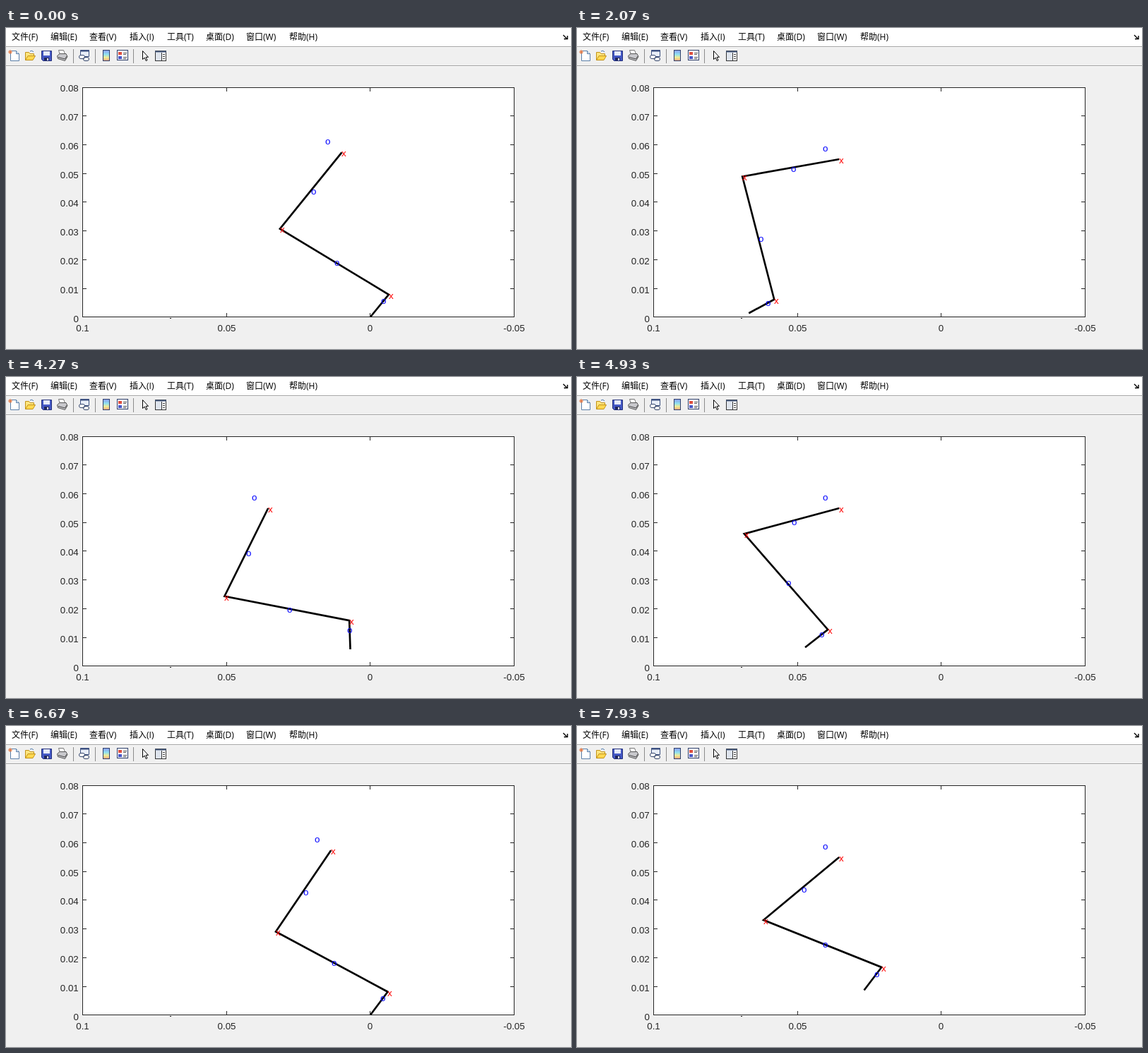
Write an HTML page that moves like this. It is 800x455 px and loops after 8 s.

```html
<!DOCTYPE html>
<html lang="zh">
<head>
<meta charset="utf-8">
<style>
  html, body { margin: 0; width: 100%; height: 100%; overflow: hidden; background: #f0f0f0; }
  svg { display: block; width: 800px; height: 455px; }
  .menu { font: 12px "Open Sans", "Noto Sans CJK SC", "Noto Sans CJK", sans-serif; }
  .label, .mark { font: 13.33px "Liberation Sans", Arial, sans-serif; }
  .label { fill: #262626; }
</style>
</head>
<body>
<svg viewBox="0 0 800 455">
  <defs>
    <linearGradient id="bar" x1="0" y1="0" x2="0" y2="1">
      <stop offset="0" stop-color="#8c9cf0"/><stop offset=".4" stop-color="#8fe0f0"/>
      <stop offset=".7" stop-color="#f5ee90"/><stop offset="1" stop-color="#f0a080"/>
    </linearGradient>
  </defs>
  <rect width="800" height="455" fill="#f0f0f0"/>
  <rect width="800" height="26" fill="#fff"/>
  <path d="M0 26.5H800M0 53.5H800" stroke="#a0a0a0"/>
  <path d="M0 27.5H800M0 54.5H800" stroke="#fff"/>
  <path d="M95.5 30V50M126.5 30V50M180.5 30V50" stroke="#8c8c8c"/>
  <path d="M789 10L794 15M795 11V15.5H790" fill="none" stroke="#000" stroke-width="1.4"/>

  <g id="icons">
    <path d="M6.5 32.5H14.5L18.5 36.5V46.5H6.5Z" fill="#fff" stroke="#5b7fa8"/>
    <path d="M14.5 32.5V36.5H18.5" fill="#d4e4f4" stroke="#5b7fa8"/>
    <path d="M3 34H9M6 31V37M4 32L8 36M8 32L4 36" stroke="#e8743a"/>
    <path d="M27.5 45.5V34.5H32.5L34 36.5H39.5V39" fill="#ffe680" stroke="#c29118"/>
    <path d="M27.5 45.5L31 39.5H41.5L38 45.5Z" fill="#ffd850" stroke="#c29118"/>
    <path d="M34 33Q37 31 39 34" fill="none" stroke="#4a78b0"/>
    <path d="M50.5 32.5H64.5V46.5H52.5L50.5 44.5Z" fill="#4458c4" stroke="#24307c"/>
    <path d="M53 33H62V39H53Z" fill="#e6ecfa"/>
    <path d="M54 42H61V46H54Z" fill="#20285c"/><path d="M58 43H60V46H58Z" fill="#fff"/>
    <path d="M76.5 38L74.5 31.5H81.5L84 38" fill="#fff" stroke="#777"/>
    <path d="M72.5 39.5L76 36.5H85L87 40.5L83.5 46.5L73.5 43.5Z" fill="#c8c8cc" stroke="#555"/>
    <path d="M74 41.5L83.5 44L86 40" fill="none" stroke="#444"/>
    <path d="M105.5 31.5H117.5V40.5H105.5Z" fill="#e8eef8" stroke="#3c5080"/>
    <path d="M105 32.5H118" stroke="#3c5080" stroke-width="2"/>
    <rect x="103.5" y="38.5" width="8" height="5" rx="2.5" fill="#fff" stroke="#34466c"/>
    <rect x="109.5" y="41.5" width="8" height="5" rx="2.5" fill="none" stroke="#34466c"/>
    <rect x="137.5" y="31.5" width="9" height="15" fill="url(#bar)" stroke="#30406c"/>
    <rect x="157.5" y="31.5" width="15" height="14" fill="#fff" stroke="#30406c"/>
    <path d="M159 34H164V38H159Z" fill="#e05040"/><path d="M159 40H164V44H159Z" fill="#4858c8"/>
    <path d="M166 35.5H171M166 37.5H170M166 41.5H171M166 43.5H170" stroke="#555"/>
    <path d="M193.5 32.5V44.5L196.2 42L198.2 46.5L200 45.7L198 41.3H201.5Z" fill="#fff" stroke="#000"/>
    <rect x="211.5" y="32.5" width="15" height="14" fill="#fff" stroke="#333"/>
    <path d="M211 33.5H227" stroke="#44587c" stroke-width="2"/>
    <path d="M220.5 35V46" stroke="#333"/><path d="M212 35H220V46H212Z" fill="#dfe5ee"/>
    <path d="M222 37.5H225M222 40.5H225M222 43.5H225" stroke="#444"/>
  </g>

  <rect x="108.5" y="84.5" width="611" height="325" fill="#fff" stroke="#262626"/>
  <path id="ticks" stroke="#262626"/>
  <g id="text"></g>
  <rect x="232" y="411" width="2" height="1" fill="#000"/>
  <polyline id="leg" fill="none" stroke="#000" stroke-width="2.67"/>
  <g id="marks"></g>
</svg>

<script>
const $ = id => document.getElementById(id);
const { sin, cos, PI } = Math;

function addText(parent, text, x, y, cls, attrs = {}) {
  const el = document.createElementNS('http://www.w3.org/2000/svg', 'text');
  el.textContent = text;
  for (const [k, v] of Object.entries({ x, y, class: cls, ...attrs })) el.setAttribute(k, v);
  return $(parent).appendChild(el);
}

// Menu
const menu = { '文件(F)': 8, '编辑(E)': 63, '查看(V)': 118, '插入(I)': 175,
               '工具(T)': 228, '桌面(D)': 283, '窗口(W)': 340, '帮助(H)': 401 };
for (const [name, x] of Object.entries(menu)) addText('text', name, x, 17, 'menu');

// Axes
let ticks = '';
for (let i = 0; i <= 8; i++) {
  const y = 410 - i * 40.78;
  if (i % 8) ticks += `M108 ${Math.floor(y) + .5}h6m600 0h6`;
  addText('text', i ? '0.0' + i : '0', 102.8, Math.round(y + 6.6), 'label', { 'text-anchor': 'end' });
}
['0.1', '0.05', '0', '-0.05'].forEach((name, i) => {
  const x = Math.round(108 + i * 203.67) + .5;
  ticks += `M${x} 84v6m0 314v6`;
  addText('text', name, x, 430, 'label', { 'text-anchor': 'middle' });
});
$('ticks').setAttribute('d', ticks);

// Gait: the foot swings forward over a resting hip, then the hip travels over a planted foot.
const PERIOD = 49.5, SWING = .6, STRIDE = 285.5;
const HIP = [371.2, 186], GROUND = 409.5;
const THIGH = 139.2, SHANK = 180, FOOT = 40.9;

const cycloid = t => t - sin(2 * PI * t) / (2 * PI);

function swing(t) {
  const reach = cycloid(.985 * t);
  const height = 35 * sin(PI * t ** .84) ** 2.5;
  const curl = t < .5 ? 27.5 * sin(2 * PI * t) ** 2 : 0;
  return { reach, curl, hip: HIP, toe: [516 - STRIDE * reach, GROUND - height] };
}

function stance(t) {
  const reach = 1 - t ** 1.1;
  const lift = 10 * (1 - (1 - t) ** 3) * (1 - t ** 20);
  return { reach, curl: 0, hip: [HIP[0] + STRIDE * reach, HIP[1] - lift], toe: [516, GROUND] };
}

function pose(phase) {
  const { reach, curl, hip, toe } =
    phase < SWING ? swing(phase / SWING) : stance((phase - SWING) / (1 - SWING));
  const tilt = (16 + 47 * reach ** .7 - curl) * PI / 180;
  const alongFoot = (length, side = 0) => [
    toe[0] + length * sin(tilt) - side * cos(tilt),
    toe[1] - length * cos(tilt) - side * sin(tilt)];
  const ankle = alongFoot(FOOT);

  // Two-link solution for the knee, bending to the left
  const dx = ankle[0] - hip[0], dy = ankle[1] - hip[1], dist = Math.hypot(dx, dy);
  const bend = Math.acos((THIGH ** 2 + dist ** 2 - SHANK ** 2) / (2 * THIGH * dist));
  const angle = Math.atan2(dx, dy) - bend;
  const knee = [hip[0] + THIGH * sin(angle), hip[1] + THIGH * cos(angle)];
  return { hip, knee, ankle, toe, footMass: alongFoot(28.5, 3.3) };
}

const middle = (a, b) => [(a[0] + b[0]) / 2, (a[1] + b[1]) / 2];
const marks = [...'xxxoooo'].map(c =>
  addText('marks', c, 0, 0, 'mark', { fill: c === 'x' ? '#f00' : '#00f' }));

function draw(now) {
  // 15 steps per second, held on a 10 ms clock
  const time = Math.floor(now % 8000 / 10) * 10;
  const step = Math.floor((time + 4) * .015);
  const { hip, knee, ankle, toe, footMass } = pose((step + 42.8) / PERIOD % 1);
  $('leg').setAttribute('points', [hip, knee, ankle, toe].join(' '));
  const spots = [hip, knee, ankle, [hip[0] - 23, hip[1] - 17],
    middle(hip, knee), middle(knee, ankle), footMass];
  spots.forEach(([x, y], i) => {
    marks[i].setAttribute('x', Math.round(x));
    marks[i].setAttribute('y', Math.round(y + 5.8));
  });
}

let start;
function loop(now) {
  start ??= now;
  draw(now - start);
  requestAnimationFrame(loop);
}
draw(0);
requestAnimationFrame(loop);
</script>
</body>
</html>
```
